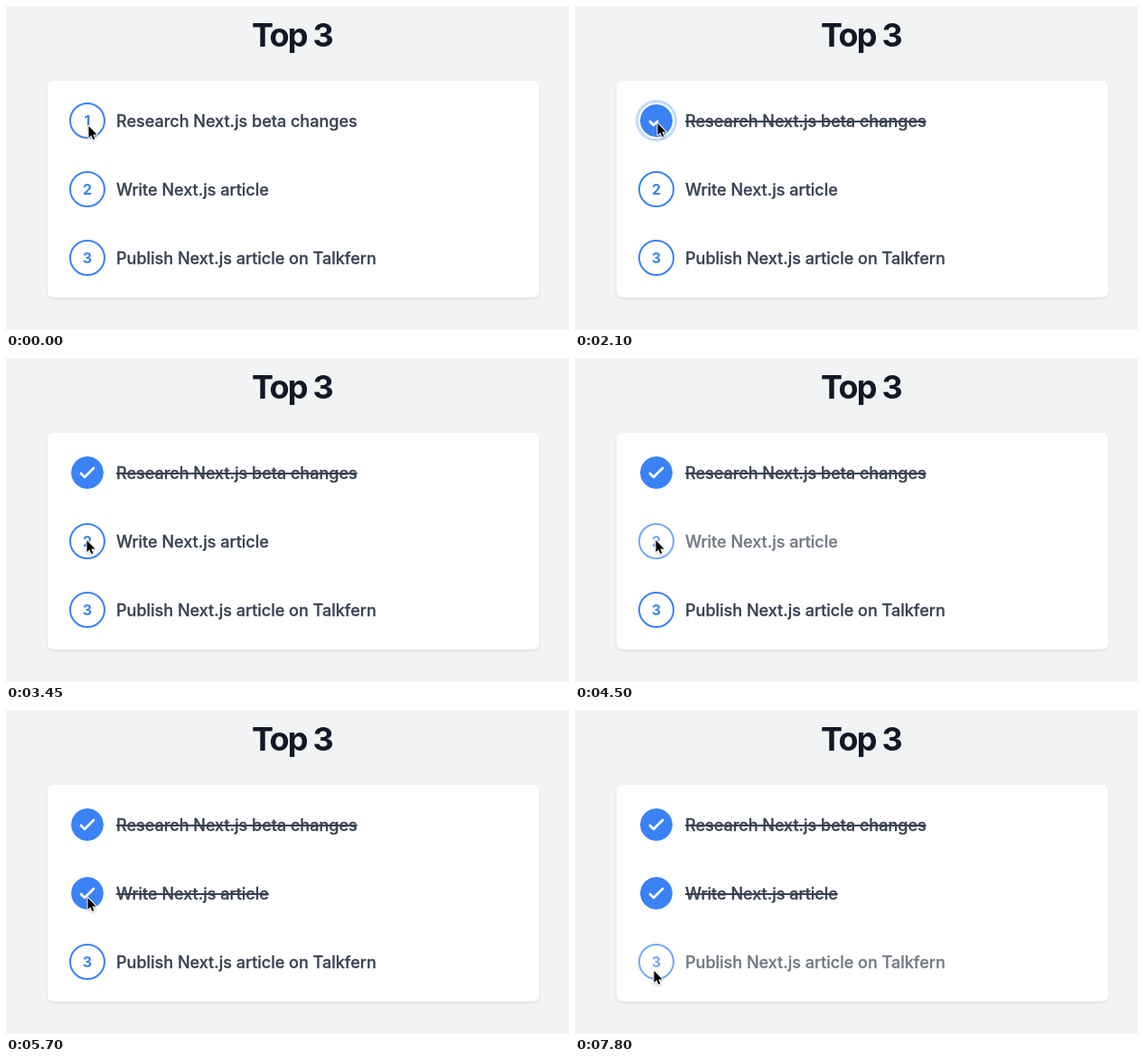
Write an HTML page that moves like this. It is 623x359 px and loops after 8 s.

```html
<!DOCTYPE html>
<html lang="en">
<head>
<meta charset="utf-8">
<title>Top 3</title>
<style>
  * { box-sizing: border-box; }
  html, body { margin: 0; width: 100%; height: 100%; overflow: hidden; }
  body { position: relative; background: #f2f3f5; font-family: Inter, "Liberation Sans", sans-serif; }
  h1 {
    position: absolute; left: 44.5px; top: 12px; width: 544px; margin: 0;
    font-size: 36px; line-height: 40px; font-weight: 700; letter-spacing: -0.05em;
    text-align: center; color: #111827;
  }
  ul {
    position: absolute; left: 46px; top: 83px; width: 544px; height: 240px;
    margin: 0; padding: 24px; list-style: none;
    display: flex; flex-direction: column; gap: 36px;
    background: #fff; border-radius: 6px;
    box-shadow: 0 1px 3px rgba(0, 0, 0, .1), 0 1px 2px -1px rgba(0, 0, 0, .1);
  }
  li { display: flex; align-items: center; gap: 12px; height: 40px; }
  .step { position: relative; flex: none; width: 40px; height: 40px; }
  .ring { position: absolute; inset: 0; border-radius: 50%; background: #bfdbfe; }
  .dot { position: absolute; inset: 0; border-radius: 50%; }
  .num {
    position: absolute; inset: 0; line-height: 40px; text-align: center;
    font-size: 16px; font-weight: 700; color: #3b82f6;
  }
  .step svg { position: absolute; left: 8px; top: 7.5px; }
  .tick {
    fill: none; stroke: #fff; stroke-width: 2.7; stroke-linecap: round; stroke-linejoin: round;
    stroke-dasharray: 1 2;
  }
  .label {
    position: relative; top: 1px; font-size: 18px; line-height: 28px; font-weight: 500;
    color: #374151; -webkit-text-stroke: 0.3px; white-space: nowrap;
  }
  .done .label { text-decoration: line-through 2px; }
  .done .num { visibility: hidden; }
  #cursor { position: absolute; left: -2px; top: -2px; overflow: visible; }
</style>
</head>
<body>
<h1>Top 3</h1>
<ul></ul>
<svg id="cursor" width="16" height="22" viewBox="-2 -2 16 22">
  <path d="M0.5 0V13L3.4 10.3L5.4 15L7.4 14.2L5.4 9.5H9.6Z" fill="#000" stroke="#fff"
    stroke-width="2" stroke-linejoin="round" paint-order="stroke"
    style="filter: drop-shadow(0 1px 1px rgba(0, 0, 0, .25))"/>
</svg>
<script>
const LOOP = 8000, TICK = 150;

// When each task is pressed and when the press is let go
const tasks = [
  { text: 'Research Next.js beta changes', press: 1350, release: 1780 },
  { text: 'Write Next.js article', press: 4500, release: 4780 },
  { text: 'Publish Next.js article on Talkfern', press: 7800, release: Infinity }
];

// Pointer tip: time, x, y
const path = [
  [450, 91, 133], [750, 91, 130], [2550, 91, 130], [2700, 91, 135],
  [2850, 96, 159], [3000, 100, 182], [3150, 98, 196], [3300, 92, 201], [3450, 89, 202],
  [5550, 89, 202], [5700, 90, 208], [5850, 90, 208],
  [6000, 90, 234], [6150, 90, 262], [6300, 90, 281], [6450, 89, 289],
  [6900, 89, 289], [7200, 87, 289]
];

const clamp = v => Math.min(1, Math.max(0, v));
const lerp = (a, b, u) => a + (b - a) * u;
const mix = (a, b, u) => `rgb(${a.map((v, i) => Math.round(lerp(v, b[i], u)))})`;
const circOut = u => Math.sqrt(1 - (1 - u) ** 2);
const easeOut = u => 1 - (1 - u) ** 1.7;
const WHITE = [255, 255, 255], BLUE = [59, 130, 246];

const list = document.querySelector('ul');
const cursor = document.getElementById('cursor');

tasks.forEach((task, i) => {
  const row = document.createElement('li');
  row.innerHTML = `
    <div class="step">
      <div class="ring"></div><div class="dot"></div><div class="num">${i + 1}</div>
      <svg width="24" height="24" viewBox="0 0 24 24">
        <path class="tick" pathLength="1" d="M5 13l4 4L19 7"/>
      </svg>
    </div>
    <span class="label">${task.text}</span>`;
  list.append(row);
  task.row = row;
  for (const part of ['ring', 'dot', 'tick']) task[part] = row.querySelector('.' + part);
});

function drawTask({ row, ring, dot, tick, press, release }, t) {
  const age = t - release;
  const fill = clamp(age / 200);
  const wave = clamp((age - 200) / 600);
  const drawn = easeOut(clamp((age - 200) / 300));

  row.classList.toggle('done', age >= 0);
  row.style.opacity = t >= press && age < 0 ? 0.7 : 1;
  ring.style.transform = `scale(${1 + 0.25 * circOut(wave)})`;
  ring.style.opacity = wave > 0 ? 1 - wave ** 3 : 0;
  dot.style.border = `2px solid ${mix(BLUE, WHITE, fill)}`;
  dot.style.background = `${mix(WHITE, BLUE, fill)} padding-box`;
  tick.style.visibility = drawn > 0 ? 'visible' : 'hidden';
  tick.style.strokeDashoffset = 1 - drawn;
}

function drawCursor(t) {
  const next = path.findIndex(p => p[0] > t);
  const b = path[next < 0 ? path.length - 1 : next];
  const a = next > 0 ? path[next - 1] : b;
  const u = b === a ? 0 : (t - a[0]) / (b[0] - a[0]);
  cursor.style.transform = `translate(${lerp(a[1], b[1], u)}px, ${lerp(a[2], b[2], u)}px)`;
}

// Motion advances in fixed ticks, like a screen recording
function render(now) {
  const t = Math.floor((now % LOOP) / TICK) * TICK;
  tasks.forEach(task => drawTask(task, t));
  drawCursor(t);
}

const start = performance.now();
function loop() {
  render(performance.now() - start);
  requestAnimationFrame(loop);
}
loop();
</script>
</body>
</html>
```
